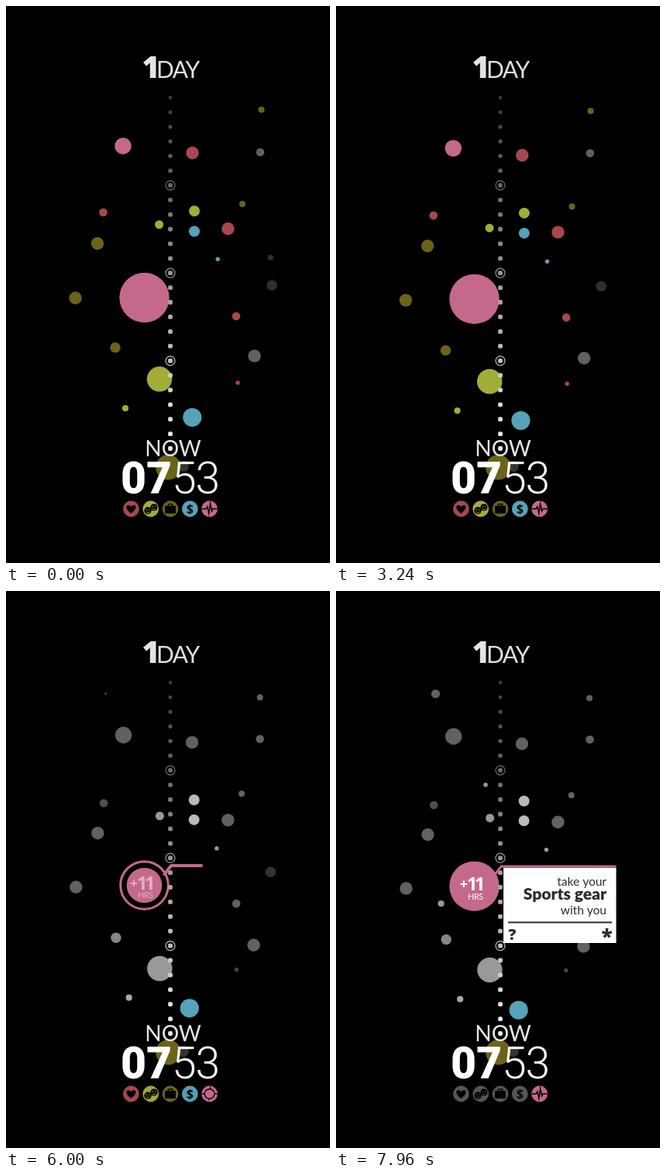
Recreate the animation shown at these times as an HTML page with a canvas. Size 418 by 720 pixels, loop 8 s.

```html
<!DOCTYPE html>
<html lang="en">
<head>
<meta charset="utf-8">
<title>One day timeline</title>
<style>
html, body { margin: 0; width: 100%; height: 100%; overflow: hidden; background: #000; }
canvas { display: block; }
</style>
</head>
<body>
<canvas id="stage" width="418" height="720"></canvas>
<script>
const ctx = document.getElementById('stage').getContext('2d');
const LOOP = 8000;
const PINK = '#c4698b', RED = '#a8484e', LIME = '#a3ad35', OLIVE = '#6b6318',
      BLUE = '#55a3b8', GREY = '#616161', MID = '#999999', PALE = '#bababa',
      DUSK = '#352d2d', INK = '#2e2b2b';

// x, y, radius, drift x, drift y, colour, muted colour
const bubbles = [
  [329.5, 134, 4, -2.5, 4.5, OLIVE, GREY],
  [151, 181, 10.7, .7, 7, PINK, GREY],
  [240.5, 190, 8.2, -.6, 7.5, RED, GREY],
  [328, 189, 5.3, -.5, 3, GREY, GREY],
  [305, 256, 4, -1.3, 8, OLIVE, GREY],
  [243, 265, 7, -.4, 6.6, LIME, PALE],
  [125.5, 266.8, 5.3, .7, 10, RED, '#5a4a4a'],
  [197.6, 282.5, 5.5, 1, 11, LIME, MID],
  [243, 291.3, 7, -.5, 5.8, BLUE, PALE],
  [286.4, 288, 8.2, 0, 10.8, RED, GREY],
  [118, 307, 8.2, .4, 8, OLIVE, GREY],
  [273.2, 327.3, 2.7, -1.8, 7.2, BLUE, MID],
  [343, 361, 6.8, -2.2, 3, DUSK, '#392e2b'],
  [89.6, 377.5, 8.2, .9, 7, OLIVE, GREY],
  [297, 401, 5.3, .2, 4, RED, GREY],
  [141, 441.5, 6.7, 1.2, 9, OLIVE, '#858585'],
  [320.5, 452.4, 8.2, -1.2, 7.2, GREY, GREY],
  [198, 482.3, 16.2, .4, 7.6, LIME, MID],
  [299, 487, 2.7, -2.2, 3.2, RED, '#4a4444'],
  [154, 520, 4.1, 6.2, 7.6, LIME, '#a8a8a8'],
  [240.3, 531.8, 12.1, -4.7, 10, BLUE, BLUE]
];
// x, y, radius, colour, birth, full size
const newcomers = [
  [128.5, 132, 5.6, GREY, 5960, 6500],
  [193, 249.5, 2.8, MID, 7400, 7900],
  [135.6, 403, 4.1, MID, 7300, 7750]
];

const ramp = (t, a, b) => Math.min(1, Math.max(0, (t - a) / (b - a)));
const ease = p => 1 - (1 - p) ** 3;
const rgb = hex => [1, 3, 5].map(i => parseInt(hex.slice(i, i + 2), 16));
function mix(a, b, p) {
  const to = rgb(b);
  return `rgb(${rgb(a).map((v, i) => Math.round(v + (to[i] - v) * p))})`;
}
function disc(x, y, r, color) {
  if (r <= 0) return;
  ctx.fillStyle = color;
  ctx.beginPath();
  ctx.arc(x, y, r, 0, 7);
  ctx.fill();
}
function ring(x, y, r, width, color) {
  ctx.strokeStyle = color;
  ctx.lineWidth = width;
  ctx.beginPath();
  ctx.arc(x, y, r, 0, 7);
  ctx.stroke();
}
function path(points, width, color) {
  ctx.strokeStyle = color;
  ctx.lineWidth = width;
  ctx.beginPath();
  points.forEach(p => ctx.lineTo(...p));
  ctx.stroke();
}
function label(text, x, y, font, color, align = 'left', spacing = 0) {
  ctx.font = font + ', sans-serif';
  ctx.letterSpacing = spacing + 'px';
  ctx.textAlign = align;
  ctx.fillStyle = color;
  ctx.fillText(text, x, y);
}

function drawTimeline() {
  for (let i = 0; i < 25; i++) {
    const y = 118.4 + 18.9 * i, v = Math.round(56 + 180 * (i / 24) ** .9);
    const color = `rgb(${v},${v},${v})`;
    const s = 2.3 + .6 * Math.min(1, i / 8);
    const hour = i % 6 === 0 && i > 0 && i < 24;
    ctx.fillStyle = color;
    ctx.beginPath();
    ctx.roundRect(212 - s, y - s, 2 * s, 2 * s, 1.8);
    ctx.fill();
    if (hour) ring(212, y, 6, 1.2, color);
  }
}

function drawTitles() {
  label('1', 175.5, 93, '800 39px "Open Sans"', '#e4e4e4');
  label('DAY', 194, 93, '400 30px Lato', '#e0e0e0', 'left', -1.5);
  label('NOW', 179.3, 582, '400 28px Lato', '#e6e6e6');
  label('07', 148, 630, '900 57px Roboto', '#fff');
  label('53', 214, 630, '300 57px Roboto', '#fff', 'left', -1);
}

const glyphs = [
  function heart() {
    ctx.beginPath();
    ctx.moveTo(0, 6);
    ctx.bezierCurveTo(-10, -1, -6, -8, 0, -3);
    ctx.bezierCurveTo(6, -8, 10, -1, 0, 6);
    ctx.fill();
  },
  function masks(color) {
    for (const [x, y] of [[-3.7, 2.2], [4.2, -2]]) {
      disc(x, y, 4.6, '#000');
      disc(x - 1.6, y - 1, .8, color);
      disc(x + 1.6, y - 1, .8, color);
      ctx.strokeStyle = color;
      ctx.lineWidth = 1;
      ctx.beginPath();
      ctx.arc(x, y + .6, 2.2, .3, 2.8);
      ctx.stroke();
    }
  },
  function briefcase() {
    ctx.beginPath();
    ctx.roundRect(-7, -4, 14, 10, 1.2);
    ctx.fill();
    ctx.strokeStyle = '#000';
    ctx.lineWidth = 1.4;
    ctx.strokeRect(-2.6, -6, 5.2, 3);
  },
  function dollar() {
    label('$', 0, 5.6, '700 16px "Open Sans"', '#000', 'center');
  },
  function pulse() {
    path([[-10, 0], [-4.5, 0], [-2.8, -3], [-.8, 6], [1, -7], [3, 3], [4.5, 0], [10, 0]], 1.5, '#000');
  }
];

function drawIcons(t) {
  const mute = ramp(t, 5960, 6600);
  [RED, LIME, OLIVE, BLUE, PINK].forEach((base, i) => {
    const color = i < 4 ? mix(base, '#555555', mute) : base;
    ctx.save();
    ctx.translate(161.4 + 25.3 * i, 650);
    disc(0, 0, 10.4, color);
    ctx.fillStyle = '#000';
    glyphs[i](color);
    if (i === 4) {
      const press = Math.sin(Math.PI * ramp(t, 5840, 6160));
      if (press > 0) {
        ring(0, 0, 6 * press, 2 * press, '#000');
        disc(0, 0, 5.6 * press, color);
      }
    }
    ctx.restore();
  });
}

function drawFocus(t, y) {
  const x = 178.5;
  const inset = t < 5980 ? ease(ramp(t, 5800, 5960)) : 1 - ramp(t, 6020, 6240);
  if (inset > 0) {
    disc(x, y, 32.2, '#000');
    ring(x, y, 30.8, 3, PINK);
  }
  disc(x, y, 32.2 - 9.4 * inset, PINK);
  ctx.globalAlpha = ramp(t, 5880, 6130);
  label('+', 159.8, y + 3.5, '700 18px "Open Sans"', '#fff');
  label('11', 168.8, y + 5.3, '700 24px "Open Sans"', '#fff', 'left', -3.7);
  label('HRS', 170.2, y + 17, '400 10.5px Lato', '#fff', 'left', -.3);
  ctx.globalAlpha = 1;
}

function drawLeader(t, y) {
  if (t < 5880) return;
  const reach = ramp(t, 5900, 6270);
  const end = 213 + 148.5 * reach;
  const width = 4 - ramp(t, 6100, 6400);
  ctx.lineJoin = 'round';
  path([[203.5, y - 13], [213, y - 25.5], [end, y - 25.5]], width, PINK);
  ctx.lineJoin = 'miter';
}

function drawCard(t, y) {
  const open = ease(ramp(t, 6200, 6600));
  if (!open) return;
  ctx.save();
  ctx.beginPath();
  ctx.rect(216, y - 24, 145.7, 97.3 * open);
  ctx.clip();
  ctx.fillStyle = '#fff';
  ctx.fillRect(216, y - 24, 145.7, 98);
  ctx.globalAlpha = ramp(t, 6350, 6700);
  label('take your', 349, y - 1, '400 15.5px Lato', INK, 'right');
  label('Sports gear', 349, y + 17, '900 21px Lato', INK, 'right');
  label('with you', 349, y + 36.3, '400 15.5px Lato', INK, 'right');
  ctx.fillStyle = INK;
  ctx.fillRect(222, y + 45.8, 134, 2);
  ctx.globalAlpha = ramp(t, 6700, 7100);
  label('?', 227.3, y + 69.5, '800 20px "Open Sans"', INK, 'center');
  label('*', 349.5, y + 74.5, '800 26px "Open Sans"', INK, 'center');
  ctx.restore();
}

function draw(t) {
  ctx.fillStyle = '#000';
  ctx.fillRect(0, 0, 418, 720);
  const k = t / LOOP;
  const mute = ramp(t, 5780, 5980);

  disc(341.3, 325, 3.6 * (1 - ramp(t, 200, 840)), DUSK);
  for (const [x, y, r, dx, dy, color, muted] of bubbles) {
    disc(x + dx * k, y + dy * k, r, mix(color, muted, mute));
  }
  for (const [x, y, r, color, from, to] of newcomers) {
    disc(x, y + k, r * ease(ramp(t, from, to)), color);
  }
  disc(229, 595, 7, '#333');
  disc(209.3, 596.3, 16.2, OLIVE);

  const y = 377 + 4.6 * k;
  drawFocus(t, y);
  drawTimeline();
  drawLeader(t, y);
  drawCard(t, y);
  drawTitles();
  drawIcons(t);
}

const start = performance.now();
function tick() {
  draw((performance.now() - start) % LOOP);
  requestAnimationFrame(tick);
}
tick();
</script>
</body>
</html>
```
